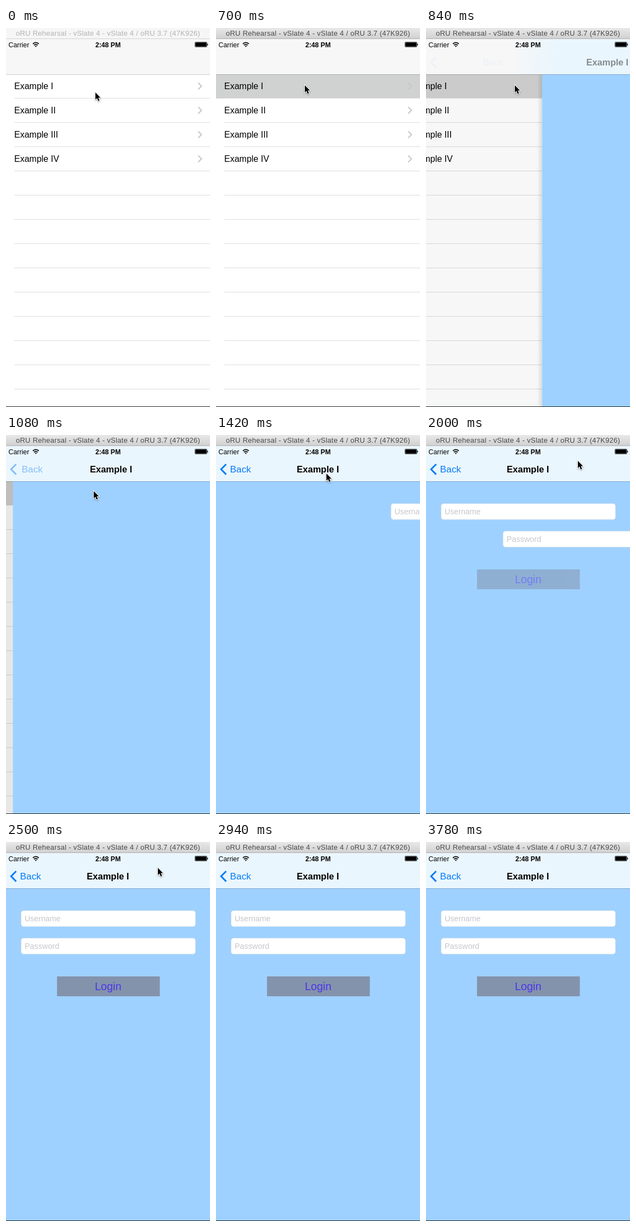
These frames come from a looping animation (372 by 688 pixels, 4280 ms). An HTML page:

```html
<!DOCTYPE html>
<html lang="en">
<head>
<meta charset="utf-8">
<style>
  html, body { margin: 0; width: 100%; height: 100%; overflow: hidden; background: #fff; }
  svg { display: block; width: 372px; height: 688px; }
  text { font-family: "Liberation Sans", Arial, sans-serif; white-space: pre; }
  .bold { font-weight: bold; }
  .hint { fill: #c7c7cd; }
  #cursor { filter: drop-shadow(0 1px 1px #0006); }
</style>
</head>
<body>
<svg viewBox="0 0 372 688">
  <defs>
    <linearGradient id="shade">
      <stop offset="0" stop-opacity="0"/><stop offset="1" stop-opacity=".2"/>
    </linearGradient>
    <linearGradient id="tint">
      <stop offset="0" stop-color="#eaf6fd" stop-opacity="0"/><stop offset="1" stop-color="#eaf6fd"/>
    </linearGradient>
    <linearGradient id="chrome" x2="0" y2="1">
      <stop offset="0" stop-color="#e8e8e8"/><stop offset="1" stop-color="#d0d0d0"/>
    </linearGradient>
  </defs>

  <!-- list screen -->
  <rect width="372" height="688" fill="#fff"/>
  <g id="list">
    <rect id="selected" y="84" width="500" height="44" fill="#d0d2d1"/>
    <g id="rows"></g>
  </g>
  <rect id="dim" y="84" width="372" height="603"/>

  <!-- login screen -->
  <g id="page">
    <rect id="edge" x="-9" y="85" width="9" height="602" fill="url(#shade)"/>
    <rect y="84" width="372" height="603" fill="#9ed1ff"/>
    <g id="login">
      <rect x="93" y="244" width="187.5" height="36" fill="#8493ac"/>
      <text x="186.3" y="269" font-size="19.8" fill="#4a36ec" text-anchor="middle">Login</text>
    </g>
    <g id="user">
      <rect x="27.5" y="124.5" width="318" height="29" rx="4.5" fill="#fff" stroke="#cfdfee"/>
      <text class="hint" x="34" y="144" font-size="14.2">Username</text>
    </g>
    <g id="pass">
      <rect x="27.5" y="174.5" width="318" height="29" rx="4.5" fill="#fff" stroke="#cfdfee"/>
      <text class="hint" x="34" y="194" font-size="14.4">Password</text>
    </g>
  </g>

  <!-- navigation and status bars -->
  <rect y="20" width="372" height="64" fill="#f7f7f7"/>
  <g id="barTint">
    <rect x="-80" y="20" width="80" height="64" fill="url(#tint)"/>
    <rect y="20" width="372" height="64" fill="#eaf6fd"/>
  </g>
  <rect y="84" width="372" height="1" fill="#000" opacity=".2"/>
  <text id="title" class="bold" x="147.3" y="68" font-size="16.5">Example I</text>
  <g id="back" fill="#067cf8">
    <path d="M18.5 53 9.3 62.3l9.2 9.3" fill="none" stroke="#067cf8" stroke-width="3"/>
    <text id="backText" x="25.5" y="68" font-size="17.3">Back</text>
  </g>
  <text x="4.5" y="35" font-size="12.4">Carrier</text>
  <g fill="none" stroke="#000" stroke-width="1.8">
    <path d="M49 28.7q5.4-4.6 10.8 0M51 31.3q3.4-2.8 6.8 0"/>
    <path d="M52.6 32.8q1.8-1.3 3.6 0l-1.8 2z" fill="#000" stroke="none"/>
  </g>
  <text class="bold" x="163" y="35" font-size="12.2">2:48 PM</text>
  <rect x="344.5" y="25.5" width="22" height="9" rx="1.5" fill="none" stroke="#000" stroke-width=".6"/>
  <rect x="345.3" y="26.3" width="20.4" height="7.4" rx=".8"/>
  <rect x="367" y="28.5" width="1.3" height="3" rx=".6"/>

  <!-- window frame -->
  <rect id="frame" width="372" height="20"/>
  <rect id="frameLine" y="19" width="372" height="1"/>
  <text id="caption" x="186" y="14" font-size="13" letter-spacing=".27" text-anchor="middle">oRU Rehearsal - vSlate 4 - vSlate 4 / oRU 3.7 (47K926)</text>
  <rect y="687" width="372" height="1" fill="#1c2127"/>

  <path id="cursor" d="M0 0v13l3-2.7 2.2 5.1 2.3-1-2.2-5h4z" stroke="#fff" stroke-width="2" paint-order="stroke"/>
</svg>

<script>
const LOOP = 4280, PUSH = 747, SHOWN = 1260, CLICK = 600;
const $ = id => document.getElementById(id);
const set = (id, attrs) => { for (const k in attrs) $(id).setAttribute(k, attrs[k]); };
const shift = (id, x, y = 0) => set(id, { transform: `translate(${x} ${y})` });
const ramp = (t, start, length) => Math.min(1, Math.max(0, (t - start) / length));

$('rows').innerHTML = Array.from({ length: 13 }, (_, i) => {
  const y = 84 + 44 * i, numeral = ['I', 'II', 'III', 'IV'][i];
  const line = `<rect x="15" y="${y + 43}" width="500" height="1" fill="#dcdcdf"/>`;
  return line + (numeral ? `<text x="15" y="${y + 27}" font-size="16">Example ${numeral}</text>
    <path d="M350.5 ${y + 15.5}l6 6-6 6" fill="none" stroke="#c7c7cc" stroke-width="2"/>` : '');
}).join('');

// Ease-in-out, cubic-bezier(.42, 0, .58, 1)
function ease(p) {
  let lo = 0, hi = 1, s;
  for (let i = 0; i < 20; i++) {
    s = (lo + hi) / 2;
    const x = 1.26 * s * (1 - s) ** 2 + 1.74 * s * s * (1 - s) + s ** 3;
    if (x < p) lo = s; else hi = s;
  }
  return s * s * (3 - 2 * s);
}

// Share of the push still to go: critically damped spring
function remaining(t) {
  if (t >= SHOWN) return 0;
  const k = 0.0156 * Math.max(0, t - PUSH);
  return (1 + k) * Math.exp(-k);
}

const path = [[0, 163, 117], [20, 163, 117], [160, 162, 104], [840, 162, 104], [1080, 160, 102],
  [1220, 165, 96], [1420, 201, 70], [1640, 277, 47], [2740, 277, 47], [2940, 374, 6], [LOOP, 374, 6]];
function pointer(t) {
  const i = path.findIndex(p => p[0] > t), [a, b] = [path[i - 1], path[i]];
  const f = ramp(t, a[0], b[0] - a[0]);
  return [1, 2].map(j => a[j] + (b[j] - a[j]) * f);
}

function draw(now) {
  const t = now % LOOP, left = remaining(t), x = 372 * left, lag = left ** 1.15;
  const active = t >= CLICK;

  set('frame', { fill: active ? 'url(#chrome)' : '#f6f6f6' });
  set('frameLine', { fill: active ? '#b1b1b1' : '#d2d2d2' });
  set('caption', { fill: active ? '#4a4a4a' : '#b2b2b2' });
  set('selected', { opacity: +active });

  shift('list', -0.3 * (372 - x));
  set('dim', { opacity: 0.1 * (1 - left) ** 1.35 });
  shift('page', x);
  set('edge', { opacity: left < 1 ? left : 0 });
  shift('barTint', 1.1 * x);
  set('barTint', { opacity: left < 1 ? 1 : 0 });

  shift('title', 277 * lag);
  set('title', { opacity: 1 - left });
  shift('backText', 149 * lag);
  set('back', { opacity: ramp(t, 815, 600) });

  shift('user', 372 * (1 - ease(ramp(t, 1260, 500))));
  shift('pass', 372 * (1 - ease(ramp(t, 1692, 500))));
  set('login', { opacity: ease(ramp(t, 1480, 1000)) });

  shift('cursor', ...pointer(t));
  set('cursor', { opacity: t < 2940 ? 1 : 0 });
}

const start = performance.now();
(function tick() {
  draw(performance.now() - start);
  requestAnimationFrame(tick);
})();
</script>
</body>
</html>
```
